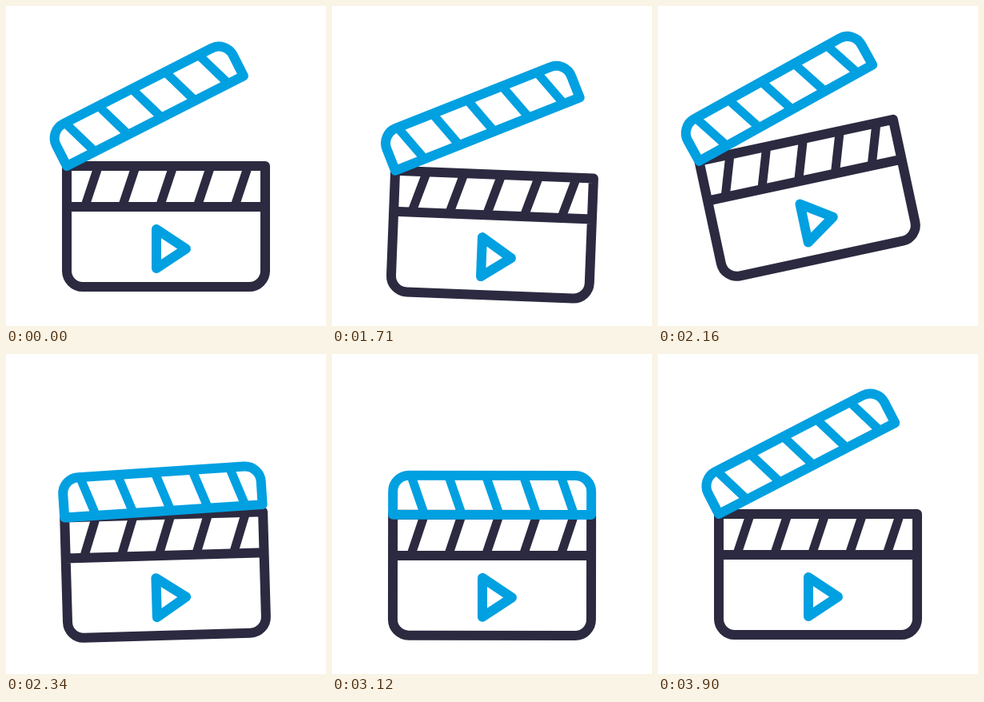
An HTML page for the animation above (3.93 s loop, 400 by 400 pixels).

```html
<!DOCTYPE html>
<html lang="en">
<head>
<meta charset="utf-8">
<title>Clapperboard</title>
<style>
  html, body { margin: 0; height: 100%; overflow: hidden; background: #fff; }
  svg { display: block; width: 100%; height: 100%; }
  path { fill: none; stroke-width: 12; stroke-linejoin: round; }
  .ink { stroke: #2c2a40; }
  .blue { stroke: #00a0e1; }
  .stripes { stroke-width: 11; }
</style>
</head>
<body>
<svg viewBox="0 0 400 400">
  <g id="board">
    <path class="ink stripes" id="lower"/>
    <path class="ink" d="M76 200H324V331a20 20 0 0 1-20 20H96a20 20 0 0 1-20-20ZM76 251H324"/>
    <path class="blue" d="M188 279V328L225 303.5Z"/>
    <g id="arm">
      <path class="blue stripes" id="upper"/>
      <path class="blue" d="M76 200H324V171a20 20 0 0 0-20-20H96a20 20 0 0 0-20 20Z"/>
    </g>
  </g>
</svg>
<script>
const LOOP = 3930, STEP = 30;
const SLAM = 2415, OPENED = 3630;
const el = id => document.getElementById(id);

function stripes(x, y, dx, dy) {
  return Array.from({ length: 5 }, (_, i) => `M${x + i * 46.8} ${y}l${dx} ${dy}`).join("");
}
el("lower").setAttribute("d", stripes(115.5, 200, -17, 51));
el("upper").setAttribute("d", stripes(98.5, 151, 17, 49));

// Arm angle: ease shut, bounce twice, swing open and ring out around rest.
function hinge(t, glide) {
  if (t < SLAM) return -27 + 5 * glide(1500, 1860) + 22 * glide(2040, SLAM);
  if (t < OPENED) {
    const u = t - SLAM;
    const bounce = u < 410 ? 6 * Math.exp(-u / 240) * Math.abs(Math.sin(Math.PI * u / 205)) : 0;
    return -bounce - 34 * glide(3300, OPENED);
  }
  const u = t - OPENED;
  return -27 - 7 * Math.exp(-u / 97) * Math.cos(Math.PI * u / 150);
}

function draw(now) {
  const t = Math.floor(now % LOOP / STEP) * STEP;
  // Smooth progress from 0 to 1 between two times.
  const glide = (from, to) => {
    const u = Math.min(1, Math.max(0, (t - from) / (to - from)));
    return (1 - Math.cos(Math.PI * u)) / 2;
  };

  // Crouch, jump, land and settle; then a single dip while reopening.
  const tilt = 3 * glide(1500, 1660) - 18 * glide(1660, 2040)
    + 18.5 * glide(2040, 2505) - 3.5 * glide(2505, 2600)
    + 3 * (glide(3090, 3390) - glide(3390, 3645));
  const lift = 13 * glide(1500, 1660) - 58 * glide(1660, 2040)
    + 55 * glide(2040, 2450) - 10 * glide(2450, 2600)
    + 13 * glide(3090, 3270) - 16 * glide(3270, 3600) + 3 * glide(3600, 3660);
  const shift = 12 * (glide(2040, 2370) - glide(1660, 2040));

  el("board").setAttribute("transform",
    `translate(${shift} ${lift}) rotate(${tilt} 200 290)`);
  el("arm").setAttribute("transform", `rotate(${hinge(t, glide)} 76 200)`);
}

const start = performance.now();
function tick() {
  draw(performance.now() - start);
  requestAnimationFrame(tick);
}
tick();
</script>
</body>
</html>
```
